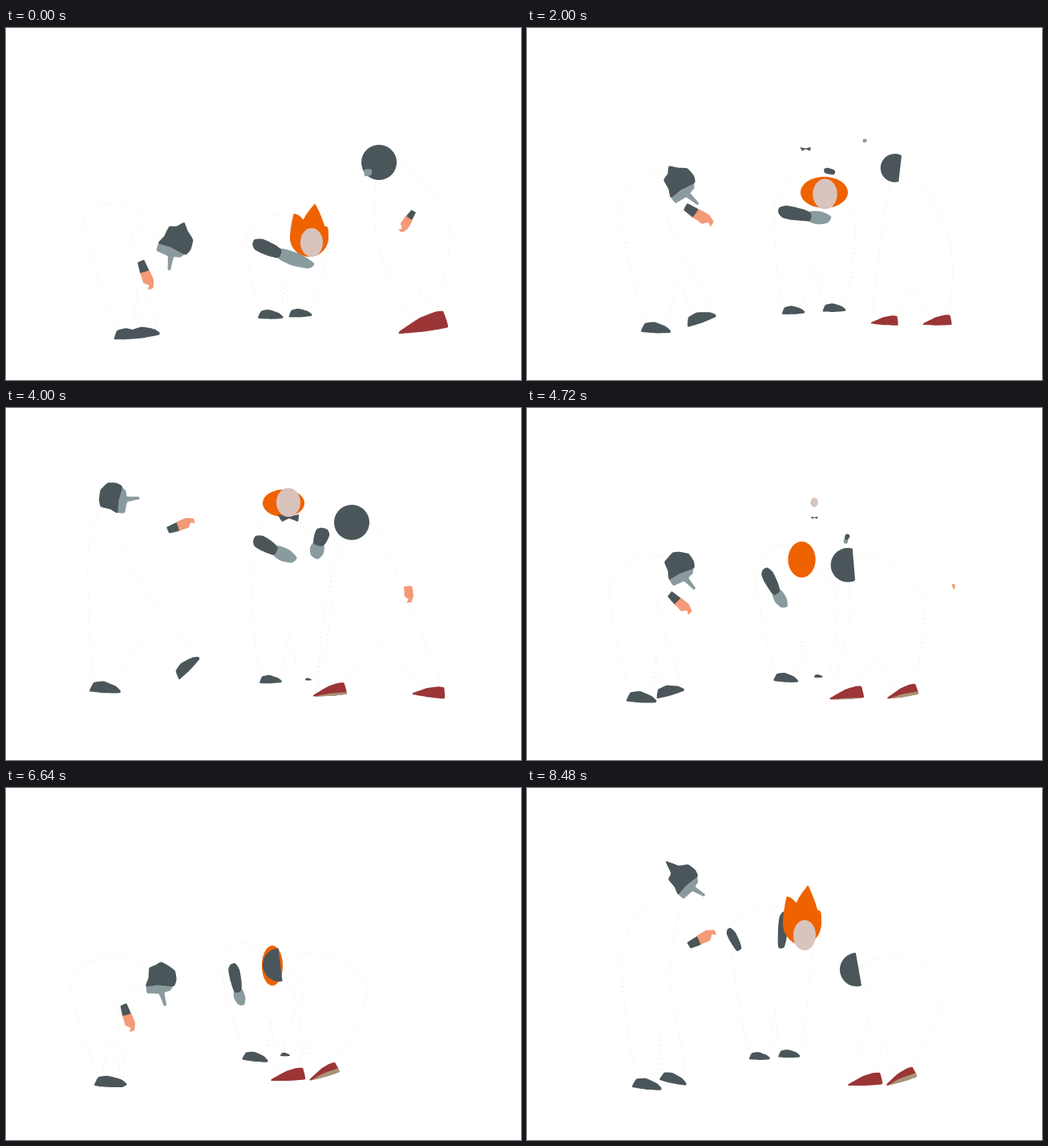
An HTML page with a canvas for the animation above (8560 ms loop, 642 by 440 pixels).

```html
<!DOCTYPE html>
<html lang="en">
<head>
<meta charset="utf-8">
<title>Dancers</title>
<style>
html, body { margin: 0; width: 100%; height: 100%; overflow: hidden; background: #fff; }
canvas { display: block; }
</style>
</head>
<body>
<canvas id="stage" width="642" height="440"></canvas>
<script>
const LOOP = 8560, STEP = 80, BEAT = 1120, RISE = 640;
const DARK = '#4b565a', GREY = '#8a9b9e', SKIN = '#f49a76', ORANGE = '#ee6200',
      PINK = '#d8c3bd', RED = '#9b3536', TAN = '#a9957a';

// Joints of the three dancers (l, m, r) in the main poses.
// Back, tie, ear: x, y.  Hand, cuff: x, y, angle, scale.  Shoe: x, y, angle, scale, visible sole.
// lHead: x, y, angle, scale, tip.  mFace: x, y, rx, ry.  mHair: x, y, rx, ry, flame.
// Arm: x, y, angle, sleeve, glove, width.  rHead: x, y, radius, angle, cut.
const POSES = [{
  time: 0, lBack: [97, 236], mBack: [300, 260], rBack: [553, 250],
  lHead: [212, 267, 108, 1.08, 7], lHand: [171, 299, 72, 0.95],
  lShoe1: [153, 382, -4, 1], lShoe2: [173, 380, -8, 1],
  mFace: [381, 268, 14, 18], mHair: [378, 262, 24, 24, 20], mArm: [325, 275, 22, 36, 44, 17],
  mShoe1: [330, 358, 0, 0.85], mShoe2: [367, 356, -3, 0.78],
  rHead: [465, 168, 22, 0, 1], rEar: [451, 181], rCuff: [505, 234, 125, 0.7], rHand: [505, 234, 125, 0.8],
  rShoe1: [520, 368, -5, 1.45, 0], rShoe2: [520, 370, -5, 0.8, 0]
}, {
  time: 1120, lBack: [120, 262], mBack: [317, 255], rBack: [586, 320],
  lHead: [237, 263, 100, 1.08, 13], lHand: [192, 302, 72, 1.05],
  lShoe1: [177, 388, -2, 1], lShoe2: [196, 386, -8, 1],
  mFace: [399, 288, 14.5, 15], mHair: [402, 282, 28, 25, 0], mArm: [343, 278, 25, 40, 21, 14],
  mShoe1: [345, 365, -2, 0.78], mShoe2: [398, 362, -3, 0.8],
  rHead: [480, 207, 14, 13, -0.25],
  rShoe1: [493, 389, 5, 0.78, 0], rShoe2: [535, 384, -3, 0.85, 0]
}, {
  time: 2880, lBack: [114, 190], mBack: [300, 190], rBack: [470, 220],
  lHead: [143, 124, 6, 1, 0], lHand: [218, 154, -2, 1],
  lShoe1: [145, 361, 6, 1], lShoe2: [237, 337, -32, 1.05],
  mFace: [344, 127, 16, 23], mHair: [339, 129, 31, 14, 0], mTie: [347, 151],
  mArm: [324, 186, -5, 40, 30, 19], mArm2: [377, 179, 12, 27, 0, 15],
  mShoe1: [319, 340, -4, 0.75], mShoe2: [368, 337, 0, 0.75],
  rHead: [437, 143, 21.5, 0, 1], rEar: [421, 141],
  rShoe1: [400, 341, 8, 0.8, 0], rShoe2: [489, 346, 8, 0.82, 0]
}, {
  time: 4000, lBack: [102, 190], mBack: [305, 190], rBack: [490, 215],
  lHead: [133, 112, 5, 0.98, 0], lHand: [209, 150, -18, 0.9],
  lShoe1: [124, 349, 3, 1.05], lShoe2: [225, 322, -46, 1],
  mFace: [352, 118, 15, 18], mHair: [346, 119, 26, 17, 0], mTie: [352, 137],
  mArm: [323, 171, 28, 31, 27, 17], mArm2: [393, 161, 108, 22, 17, 18],
  mShoe1: [330, 339, -2, 0.75], mShoe2: [377, 339, 0, 0.22],
  rHead: [431, 143, 22, 0, 1], rHand: [501, 219, 88, 0.8],
  rShoe1: [404, 352, -2, 0.98, 0.25], rShoe2: [528, 354, 10, 0.95, 0]
}, {
  time: 5360, lBack: [98, 220], mBack: [272, 220], rBack: [457, 260],
  lHead: [191, 140, 50, 0.98, 0], lHand: [177, 214, 18, 0.85],
  lShoe1: [137, 368, 0, 0.9], lShoe2: [156, 362, 6, 0.9],
  mHair: [353, 163, 15, 17, 24], mArm: [280, 190, 106, 30, 21, 18],
  mShoe1: [315, 345, -2, 0.75], mShoe2: [351, 342, 0, 0.3],
  rHead: [369, 171, 20, 78, 0.12],
  rShoe1: [363, 343, -18, 0.97, 0.6], rShoe2: [440, 340, -74, 0.85, 1]
}, {
  time: 6640, lBack: [80, 240], mBack: [268, 220], rBack: [451, 250],
  lHead: [193, 238, 85, 1.02, 3], lHand: [149, 278, 74, 0.9],
  lShoe1: [129, 367, 3, 1], lShoe2: [133, 367, -2, 0.95],
  mHair: [332, 222, 13, 25, 0], mArm: [286, 237, 78, 35, 18, 14],
  mShoe1: [311, 336, 6, 0.87], mShoe2: [348, 333, 0, 0.32],
  rHead: [341, 221, 21, -7, 0.05],
  rShoe1: [352, 358, 0, 1, 0], rShoe2: [396, 354, -14, 0.9, 0.5]
}, {
  time: 8480, lBack: [118, 210], mBack: [255, 180], rBack: [521, 245],
  lHead: [195, 114, 42, 0.98, 15], lHand: [209, 193, -25, 0.95],
  lShoe1: [150, 370, 6, 1], lShoe2: [183, 363, 12, 0.92],
  mFace: [346, 184, 14, 19], mHair: [343, 169, 24, 27, 22],
  mArm: [258, 189, 62, 29, 0, 11], mArm2: [319, 177, 94, 44, 0, 12],
  mShoe1: [290, 335, 0, 0.7], mShoe2: [327, 332, 0, 0.73],
  rHead: [411, 227, 21, -10, 0.12],
  rShoe1: [422, 364, 0, 1, 0], rShoe2: [466, 360, -14, 0.92, 0.5]
}];
const WIDTH = { l: 60, m: 100, r: -90 };

// The main poses, filled up with a bow on every beat and a rise after it.
const keys = POSES.map(pose => ({ time: pose.time, pose }));
function fill(time, index) {
  if (!keys.some(k => Math.abs(k.time - time) < 100)) keys.push({ time, pose: POSES[index] });
}
for (let k = 0; k < 8; k++) {
  fill(k * BEAT, k < 3 ? 1 : 5);
  fill(k * BEAT + RISE, k < 3 ? 2 : k < 6 ? 3 : 6);
}
keys.push({ time: LOOP, pose: POSES[6] });
keys.sort((a, b) => a.time - b.time);

const ctx = document.getElementById('stage').getContext('2d');
const mix = (a, b, u) => a + (b - a) * u;
const feet = (pose, who) => (pose[who + 'Shoe1'][0] + pose[who + 'Shoe2'][0]) / 2;

// Place on the floor at a time, moving evenly from one main pose to the next.
function drift(who, t) {
  const i = POSES.findIndex(p => p.time > t);
  if (i < 0) return feet(POSES[6], who);
  const a = POSES[i - 1], b = POSES[i];
  return mix(feet(a, who), feet(b, who), (t - a.time) / (b.time - a.time));
}

// Closed curve through points; bend 0 gives straight sides.
function path(p, bend) {
  const n = p.length;
  ctx.beginPath();
  ctx.moveTo(...p[0]);
  for (let i = 0; i < n; i++) {
    const [a, b, c, d] = [n - 1, 0, 1, 2].map(k => p[(i + k) % n]);
    ctx.bezierCurveTo(b[0] + (c[0] - a[0]) * bend, b[1] + (c[1] - a[1]) * bend,
      c[0] - (d[0] - b[0]) * bend, c[1] - (d[1] - b[1]) * bend, ...c);
  }
}

function shape(color, points, bend = 0.08) {
  path(points, bend);
  ctx.fillStyle = color;
  ctx.fill();
}

const ring = (n, fn) => Array.from({ length: n }, (_, i) => fn(i / n * 2 * Math.PI));

function ellipse(color, rx, ry) {
  shape(color, ring(24, a => [rx * Math.cos(a), ry * Math.sin(a)]), 0.16);
}

function at(x, y, angle, scale, paint) {
  ctx.save();
  ctx.translate(x, y);
  ctx.rotate(angle * Math.PI / 180);
  ctx.scale(scale, scale);
  paint();
  ctx.restore();
}

function darkShoe([x, y, angle, s], g) {
  at(x, y, angle, s * g, () => shape(DARK,
    [[-18, 3], [-14, -5], [-3, -7], [4, -5], [12, -2], [18, 3], [17, 6], [0, 7], [-18, 6]]));
}

function redShoe([x, y, angle, s, sole], g) {
  at(x, y, angle, s * g, () => {
    shape(RED, [[-21, 6], [-3, -4], [10, -8], [18, -8], [21, 6], [0, 8], [-21, 8]], 0.05);
    if (sole > 0) shape(TAN, [[-19, 8], [-2, 7 - 8 * sole], [20, 7 - 12 * sole], [21, 6], [5, 8]], 0.03);
  });
}

function cuff([x, y, angle, s], g) {
  at(x, y, angle, s * g, () => shape(DARK, [[-9, -4], [6, -6], [6, 6], [-8, 5]], 0.03));
}

function hand([x, y, angle, s], g) {
  at(x, y, angle, s * g, () => shape(SKIN,
    [[5, -6], [20, -8], [30, -4], [30, 3], [25, 0], [20, 6], [12, 6], [5, 6]], 0.06));
}

function helmet([x, y, angle, s, tip], g) {
  at(x, y, angle, s * g, () => {
    shape(GREY, [[8, -15], [16, -10], [18, -3], [33, -4], [34, -1], [19, 4], [17, 18], [8, 18]], 0.05);
    shape(DARK, [[11, -15], [3, -19], [-8, -18], [-16, -9], [-17 - tip, -2], [-17, 5], [-14, 13], [-2, 15], [8, 19], [8, 4]]);
  });
}

function arm([x, y, angle, sleeve, glove, width], g) {
  at(x, y, angle, g, () => {
    const l = sleeve / 2, w = width / 2;
    if (glove > 1) shape(GREY, [[l - 2, -w * 0.7], [l + glove * 0.5, -w], [l + glove, -w * 0.5],
      [l + glove * 0.9, w * 0.5], [l + glove * 0.4, w], [l - 2, w * 0.7]], 0.12);
    shape(DARK, [[-l, -w * 0.5], [-l * 0.5, -w], [l * 0.4, -w * 0.9], [l, -w * 0.5],
      [l, w * 0.7], [0, w], [-l * 0.7, w * 0.9], [-l, w * 0.3]], 0.12);
  });
}

// An oval whose upper half is drawn out into flames.
function hair([x, y, rx, ry, flame], g) {
  at(x, y, 0, g, () => shape(ORANGE, ring(60, a => {
    const up = Math.max(0, -Math.sin(a)) ** 0.5;
    const spike = Math.abs((a * 10 / Math.PI) % 4 - 2) / 2;
    return [rx * Math.cos(a), ry * Math.sin(a) - flame * up * spike];
  }), 0.1));
}

// A round head, flat where a white shoulder cuts it.
function roundHead([x, y, r, angle, cut], g) {
  at(x, y, angle, g, () => shape(DARK,
    ring(48, a => [r * Math.min(cut, Math.cos(a)), r * Math.sin(a)])));
}

const tie = ([x, y], g) => at(x, y, 0, g, () =>
  shape(DARK, [[-13, -4], [0, -1], [13, -4], [12, 5], [1, 1], [-8, 5]], 0.04));
const ear = ([x, y], g) => at(x, y, 0, g, () => shape(GREY, [[-4, -4], [5, -4], [4, 3], [-4, 4]]));
const face = ([x, y, rx, ry], g) => at(x, y, 0, g, () => ellipse(PINK, rx, ry));

const PARTS = [
  ['lShoe1', darkShoe], ['lShoe2', darkShoe], ['lHead', helmet], ['lHand', hand], ['lHand', cuff],
  ['mShoe1', darkShoe], ['mShoe2', darkShoe], ['mArm2', arm], ['mHair', hair], ['mTie', tie],
  ['mArm', arm], ['mFace', face],
  ['rShoe1', redShoe], ['rShoe2', redShoe], ['rHead', roundHead], ['rEar', ear],
  ['rHand', hand], ['rCuff', cuff]
];

// White suit on white: only a dotted edge around back, feet and chest shows.
function suit(who, pose) {
  const head = pose[who + (who === 'm' ? 'Hair' : 'Head')], [bx, by] = pose[who + 'Back'];
  const [a, b] = [pose[who + 'Shoe1'], pose[who + 'Shoe2']].sort((p, q) => p[0] - q[0]);
  const back = [bx, by], front = [bx + WIDTH[who], by + 20], leftBack = WIDTH[who] > 0;
  const shoulder = [(bx + head[0]) / 2, (by + head[1]) / 2 - 28];
  const crotch = [(a[0] + b[0]) / 2, mix(by, a[1], 0.6)];
  const legs = [[a[0] - 14, a[1] - 8], [a[0] + 12, a[1] - 8], crotch, [b[0] - 12, b[1] - 8], [b[0] + 14, b[1] - 8]];
  path([[head[0], head[1]], ...(leftBack ? [shoulder, back] : [front]), ...legs,
    ...(leftBack ? [front] : [back, shoulder])], 0.14);
  ctx.setLineDash([1, 5]);
  ctx.strokeStyle = '#e6e2b0';
  ctx.stroke();
}

function draw(t) {
  ctx.fillStyle = '#fff';
  ctx.fillRect(0, 0, 642, 440);
  const i = keys.findIndex(k => k.time > t), from = keys[i - 1], to = keys[i];
  const v = (t - from.time) / (to.time - from.time), u = v * v * (3 - 2 * v);
  const now = {}, size = {};
  for (const name of new Set([...Object.keys(from.pose), ...Object.keys(to.pose)])) {
    if (name === 'time') continue;
    const a = from.pose[name], b = to.pose[name], who = name[0];
    const shiftA = drift(who, from.time) - feet(from.pose, who);
    const shiftB = drift(who, to.time) - feet(to.pose, who);
    now[name] = (a || b).map((n, k) => mix(n, (b || a)[k], u));
    now[name][0] += mix(shiftA, shiftB, u);
    size[name] = mix(a ? 1 : 0, b ? 1 : 0, u);
  }
  for (const who in WIDTH) suit(who, now);
  for (const [name, paint] of PARTS) if (size[name] > 0) paint(now[name], size[name]);
}

function tick() {
  draw(Math.floor(performance.now() % LOOP / STEP) * STEP);
  requestAnimationFrame(tick);
}
tick();
</script>
</body>
</html>
```
